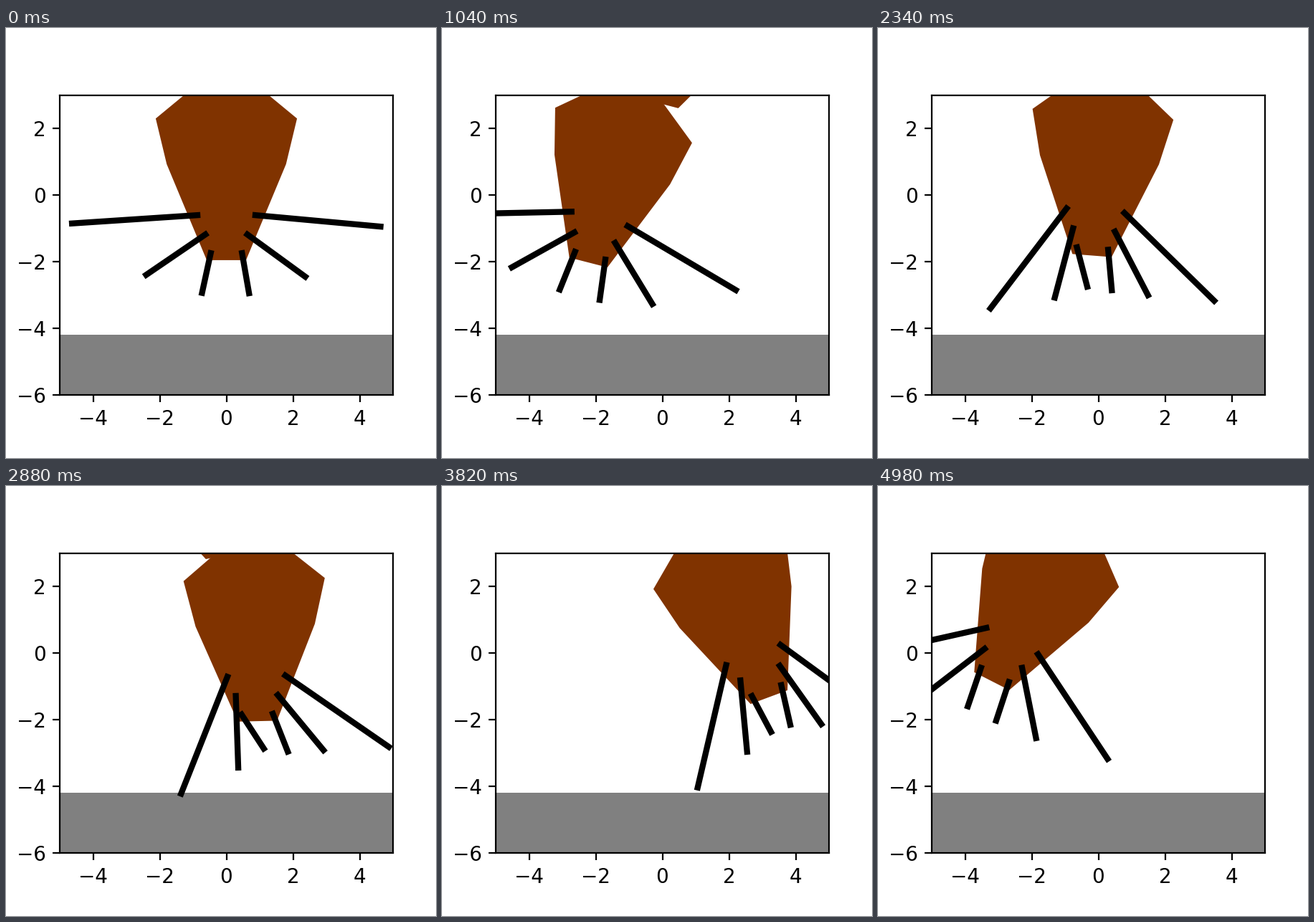
Write a matplotlib script that moves like this. It is 600 px wide and 600 px high and loops after 5 s.

```python
import numpy as np
import matplotlib.pyplot as plt
from matplotlib.animation import FuncAnimation
from matplotlib.patches import Polygon, Rectangle

FRAMES, STEP = 250, 20
BROWN = "#803300"

# Legs from top to bottom
REST = np.radians([4.5, 35.2, 78.9])
CURL = np.array([1, 0.765, 0.36])
SWAY = np.array([0.6, 0.75, 1])
LENGTHS = np.array([3.77, 2.15, 1.22])
HIPS = np.array([(0.87, 1.35), (0.63, 0.77), (0.47, 0.21)])
NECK = np.array([0, 5.16])

# time, x, y, tilt, leg curl, leg sway (degrees)
POSES = np.array([
    (0, 0, -1.95, 0, 0, 1.2),
    (820, 1.0, -2.0, -3, 45, -25),
    (1040, -2.22, -2.02, 14.4, 11.4, 0.5),
    (1720, -1.57, -1.53, 11.5, 40.4, 0),
    (2880, 0.93, -2.04, -1.3, 47, -26),
    (3820, 3.2, -1.32, -20.4, 52, 0),
    (4200, -3.9, -1.71, 19, -26, 36),
    (4980, -3.2, -0.84, 27, 30, -8.5),
])
TIMES = POSES[:, 0]


def mirrored(right):
    """Close a right-hand outline with its mirror image."""
    right = np.array(right, float)
    return np.vstack([right, right[::-1] * [-1, 1]])


BODY = mirrored([(0.59, 0), (1.79, 2.88), (2.12, 4.25), (0.86, 5.29)])
HEAD = mirrored([(1.46, 0), (2.06, 1.01), (2.5, 2.32), (1.3, 4.3)])


def pose_at(t):
    """Ease from one pose into the next."""
    k = np.clip(np.searchsorted(TIMES, t) - 1, 0, len(TIMES) - 2)
    s = (t - TIMES[k]) / (TIMES[k + 1] - TIMES[k])
    s = s * s * (3 - 2 * s)
    return POSES[k, 1:] + s * (POSES[k + 1, 1:] - POSES[k, 1:])


def rotate(points, angle):
    c, s = np.cos(angle), np.sin(angle)
    return points @ np.array([[c, s], [-s, c]])


fig, ax = plt.subplots(figsize=(3, 3), dpi=200)
ax.set_aspect("equal")
ax.set_xlim(-5, 5)
ax.set_ylim(-6, 3)
ax.add_patch(Rectangle((-6, -7), 12, 2.82, color="gray", lw=0))
body = ax.add_patch(Polygon(BODY, color=BROWN, lw=0))
head = ax.add_patch(Polygon(HEAD, color=BROWN, lw=0))
legs = {side: [ax.plot([], [], color="black", lw=3)[0] for _ in REST]
        for side in (-1, 1)}


def update(i):
    x, y, *angles = pose_at(i * STEP)
    tilt, curl, sway = np.radians(angles)

    def place(points):
        return rotate(points, -tilt) + [x, y]

    body.set_xy(place(BODY))
    head.set_xy(place(rotate(HEAD, -0.4 * sway) + NECK))
    for side, lines in legs.items():
        drop = REST + CURL * curl + side * SWAY * sway
        reach = LENGTHS[:, None] * np.column_stack([np.cos(drop), -np.sin(drop)])
        for line, hip, span in zip(lines, HIPS, reach):
            line.set_data(*place(np.array([hip, hip + span]) * [side, 1]).T)
    return [body, head, *legs[-1], *legs[1]]


anim = FuncAnimation(fig, update, frames=FRAMES, interval=STEP,
                     repeat=True, repeat_delay=0, blit=False)
plt.show()
```
